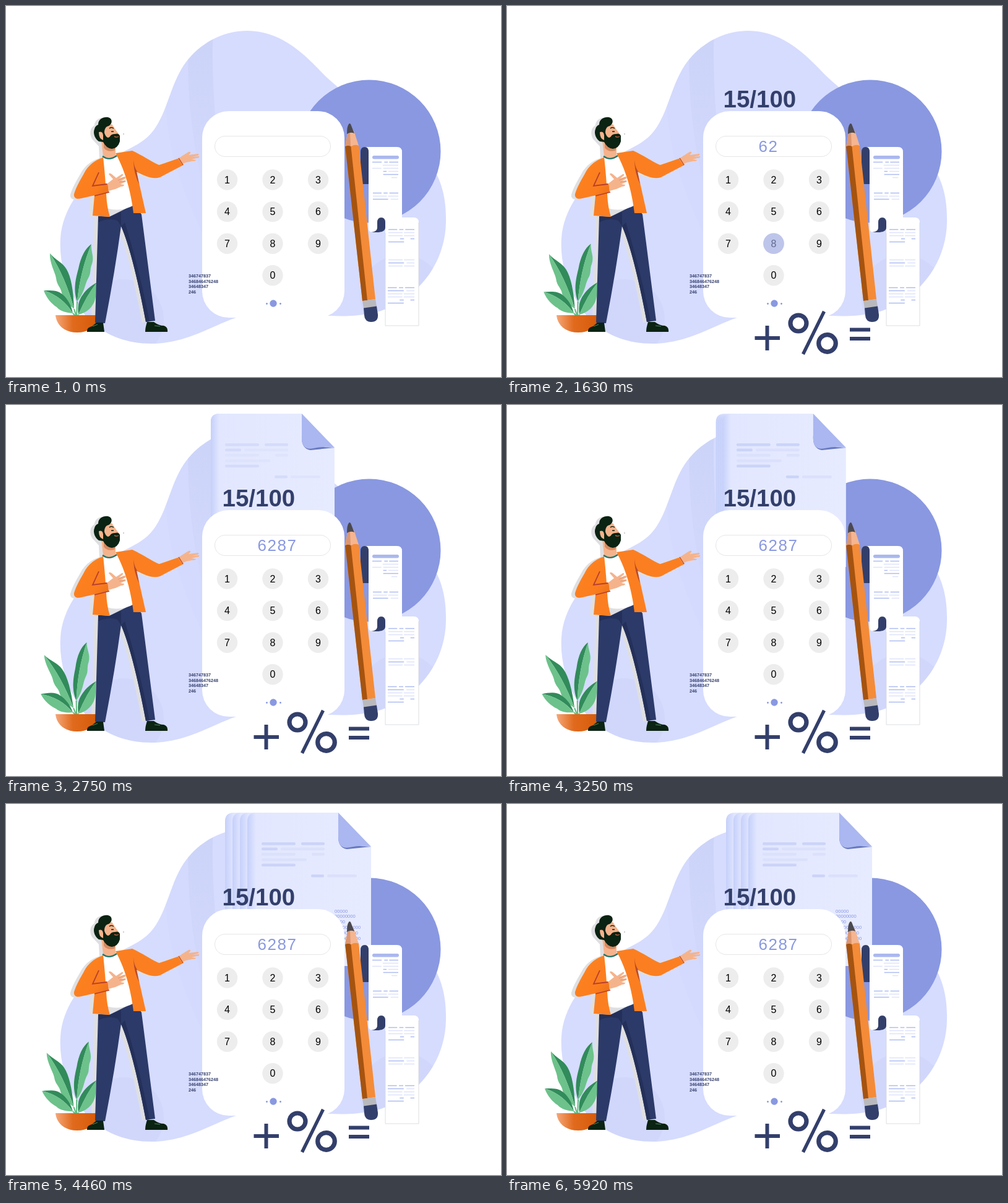
These frames come from a looping animation (800 px wide and 600 px high, 5.96 s). An HTML page:

```html
<!DOCTYPE html>
<html lang="en">
<head>
<meta charset="utf-8">
<title>Calculator</title>
<style>
html, body { margin: 0; width: 100%; height: 100%; overflow: hidden; background: #fff; }
svg { display: block; width: 800px; height: 600px; }
text { font-family: "Liberation Sans", Arial, sans-serif; }
.navy { fill: #333f6b; }
.skin { fill: #f5b38c; }
.hair { fill: #0a2312; }
.small { font-size: 7.2px; font-weight: bold; }
</style>
</head>
<body>
<svg viewBox="0 0 800 600">
<defs>
  <linearGradient id="pageFill">
    <stop offset="0" stop-color="#c5d0fa"/><stop offset=".07" stop-color="#e2e7ff"/><stop offset="1" stop-color="#e7ebff"/>
  </linearGradient>
  <linearGradient id="potFill">
    <stop offset="0" stop-color="#f6a779"/><stop offset=".4" stop-color="#e06a1d"/><stop offset="1" stop-color="#d65a08"/>
  </linearGradient>
  <linearGradient id="sleeveFill" x1="0" y1="0" x2="1" y2="1">
    <stop offset="0" stop-color="#ff8420"/><stop offset=".7" stop-color="#fb7d1e"/><stop offset="1" stop-color="#e8701a"/>
  </linearGradient>
  <linearGradient id="bandFill" x1="0" y1="0" x2="0" y2="1">
    <stop offset="0" stop-color="#b9c4ee" stop-opacity=".36"/><stop offset="1" stop-color="#b9c4ee" stop-opacity=".12"/>
  </linearGradient>
  <clipPath id="blobClip"><use href="#blob"/></clipPath>
  <path id="blob" d="M390 40C440 41 474 69 508 105C545 145 640 205 678 246C704 275 712 311 711 350C710 402 683 452 631 482C602 499 563 503 524 501L372 504C331 518 291 546 235 546C184 546 137 524 112 476C94 445 86 409 88 376C91 329 121 294 150 263C181 231 219 232 242 196C265 160 268 114 299 81C323 55 356 40 390 40Z"/>
  <path id="headShape" d="M145 214C140 205 142 196 149 192C149 184 157 179 165 180C173 182 172 190 169 194L174 196L183 209L184 220L177 230L176 246L157 246L156 226Z"/>
  <path id="coatShape" d="M157 245C142 250 132 259 126 271C119 283 113 294 110 304C109 311 115 313 122 311L143 307L140 339L168 341L206 335L226 335L211 268C225 275 237 281 249 277L287 257L280 246L248 257C241 257 222 243 205 234Z"/>
  <path id="legShape" d="M149 340L167 341L207 321L219 337L241 509L226 511Q205 400 186 356Q176 430 160 513L144 512Z"/>
</defs>

<use href="#blob" fill="#d6dcfe"/>
<g clip-path="url(#blobClip)" fill="#b9c4ee">
  <path fill="url(#bandFill)" d="M295 60L335 40C330 130 345 250 350 320L326 320C303 240 291 145 295 60Z"/>
  <path opacity=".1" d="M258 130C255 230 290 310 326 385L326 320C303 240 291 145 295 60Z"/>
  <circle opacity=".18" cx="190" cy="507" r="65"/>
  <circle opacity=".18" cx="640" cy="470" r="68"/>
</g>
<circle cx="587" cy="235" r="115.5" fill="#8998e1"/>

<g id="stack"></g>
<text id="ratio" class="navy" x="349.5" y="164" font-size="38.5" font-weight="bold">15/100</text>

<rect x="317" y="170" width="230" height="334" rx="43" fill="#fff"/>
<rect x="337.5" y="210.5" width="187" height="33" rx="16.5" fill="#fff" stroke="#e6e6e9"/>
<g id="digits" fill="#8998e1" font-size="26"></g>
<g id="keys" font-size="16" text-anchor="middle"></g>
<g fill="#8998e1">
  <circle cx="432" cy="481" r="5.7"/><circle cx="421.5" cy="481.5" r="1.4"/><circle cx="443.5" cy="481.5" r="1.4"/>
</g>
<g class="navy small">
  <text x="295" y="439">346747837</text><text x="295" y="447.6">346846476248</text>
  <text x="295" y="456.2">34648347</text><text x="295" y="464.8">246</text>
</g>

<g id="signs" fill="none" stroke="#333f6b" stroke-width="6">
  <path d="M400.5 537H441M420.5 517V557M554 523.5H587M554 538H587"/>
  <path d="M478.5 563L512.5 494" stroke-width="5.4"/>
  <circle cx="471" cy="513" r="13" stroke-width="7.2"/>
  <circle cx="517.5" cy="545.5" r="13.8" stroke-width="7.2"/>
</g>

<!-- receipts -->
<path class="navy" d="M573 288V236Q573 228 580 228H589V288Z"/>
<path d="M580 228H632Q640 228 640 236V345H606V366H592Q586 366 586 359V236Q586 228 580 228Z" fill="#fff"/>
<path class="navy" d="M587 366H599Q613 366 613 358V342H607Q600 342 600 350V358Q600 366 587 366Z"/>
<path d="M606 342H659Q667 342 667 350V517H613V350Q613 342 606 342Z" fill="#fff"/>
<path d="M667 350V517H613V367" fill="none" stroke="#d5d6dc" stroke-width=".8"/>
<rect x="592" y="242" width="43" height="5.5" rx="2.7" fill="#aab8ee"/>
<g id="receiptLines" stroke-width="1.5"></g>

<!-- pencil -->
<path d="M548 226L559 220L570 225L597 474L576 477Z" fill="#f48b38"/>
<path d="M548 226L557 223L584 476L576 477Z" fill="#a55310"/>
<path d="M555 190L548 227Q553 224 558 227Q564 223 570 226L563 204Z" fill="#f5b590"/>
<path d="M555 190L548 227Q553 224 557 227L556 204Z" fill="#dc9771"/>
<path d="M554 191Q551 194 551 207Q557 203 563 206L557 191Q555 189 554 191Z" fill="#4b4950"/>
<path d="M576 477L597 474L599 486L578 489Z" fill="#b9b9bd"/>
<path class="navy" d="M578 488.5L599 485.5L601 499Q602 511 590 511Q580 511 579 500Z"/>

<!-- figure -->
<g transform="translate(-6 1)" fill="#dfdfe1">
  <use href="#headShape"/><use href="#coatShape"/><use href="#legShape"/>
</g>
<g id="plant"></g>
<path d="M80 500H150C148 518 134 528 115 528C96 528 82 518 80 500Z" fill="url(#potFill)"/>

<use href="#legShape" fill="#2c3a69"/>
<path d="M149 340L167 341L186 333L186 356L180 347Q165 342 149 350ZM186 356L192 350Q214 420 232 510L226 511Q205 400 186 356Z" fill="#243059"/>
<path class="hair" d="M131 527Q130 520 139 518L146 512H157L159 527ZM225 527Q225 520 228 511L239 511Q247 517 255 517Q262 519 261 527Z"/>
<path d="M140 518L148 515M240 517L249 518" stroke="#4e8a63" stroke-width="1"/>
<path d="M157 244H183L201 292L207 322Q185 334 163 327Z" fill="#fff"/>
<path d="M154 217L177 226V243Q167 249 157 243Z" class="skin"/>
<path d="M158 222Q166 231 177 229L175 234Q163 237 158 229Z" fill="#d68a61"/>
<path d="M156 243Q167 251 179 242" fill="none" stroke="#23766c" stroke-width="2.2"/>
<path class="skin" d="M156 196L171 191L177 200L183 208L182 214L165 220L152 217Z"/>
<path class="hair" d="M150 219C144 215 140 206 143 199C144 195 146 193 149 192C149 183 157 179 165 180C173 182 172 191 166 194C161 195 159 199 159 205C161 212 165 215 168 211Q170 207 176 207Q182 205 184 210L184 219Q181 230 171 231Q162 230 157 220Z"/>
<path d="M150 204Q156 202 157 209L157 217Q150 215 150 204Z" class="skin"/>
<path d="M167 198Q170 195 174 198M170 203H174" fill="none" stroke="#0a2312" stroke-width="1.4"/>
<path d="M175 211Q179 213 182 211" stroke="#c75e43" stroke-width="1.5" fill="none"/>
<circle cx="190" cy="207" r=".7" fill="#777"/>

<path d="M157 245C142 250 132 259 126 271L144 296L140 339L168 341Q163 326 162 304Q160 270 157 245Z" fill="#fb7f20"/>
<path d="M177 238L204 234C222 242 241 256 248 257L280 246L287 257L249 277C237 281 225 275 211 268L226 335L206 335Q199 278 177 238Z" fill="#fb7f20"/>
<path d="M206 249Q207 262 213 269L224 273L211 268L215 288Q206 269 206 249Z" fill="#b94a2b"/>
<path d="M157 245C142 250 132 259 126 271C119 283 113 294 110 304C109 311 115 313 122 311L166 301L165 287L140 291L149 272Z" fill="url(#sleeveFill)"/>
<path d="M150 269L140 291L163 288M143 307L167 301" fill="none" stroke="#b63e30" stroke-width="1.8"/>
<path class="skin" d="M164 287L173 280L166 272Q167 269 171 272L178 278L187 272Q190 271 189 274L183 279L192 276Q195 276 193 279L186 283L193 282Q195 284 192 285L185 288L191 289Q191 292 186 292L177 296L166 299Z"/>
<path d="M181 282L191 277M183 285L192 283" stroke="#d88e68" stroke-width=".8"/>
<path class="skin" d="M278 247L287 241L295 236Q299 235 298 238L295 241L310 239Q313 240 310 242L301 244L312 243Q313 246 308 246L300 248L307 249Q307 251 301 251L291 253L284 256Z"/>
<path d="M279 246L286 257" stroke="#c85727" stroke-width="1.5"/>
</svg>

<script>
const LOOP = 5960;
const $ = id => document.getElementById(id);

function add(parent, tag, attrs, text) {
  const el = document.createElementNS("http://www.w3.org/2000/svg", tag);
  for (const key in attrs) el.setAttribute(key, attrs[key]);
  if (text !== undefined) el.textContent = text;
  parent.appendChild(el);
  return el;
}
const clamp = v => Math.min(1, Math.max(0, v));
const span = (t, start, end) => clamp((t - start) / (end - start));
const easeOut = p => 1 - (1 - p) ** 3;
const easeBoth = p => (1 - Math.cos(Math.PI * p)) / 2;

// Keypad: overlay shades light up as keys are pressed.
const shades = {};
[1, 2, 3, 4, 5, 6, 7, 8, 9, 0].forEach((n, i) => {
  const cx = n ? 357.5 + (i % 3) * 73.5 : 431;
  const cy = 281 + Math.floor(i / 3) * 51.6;
  add($("keys"), "circle", { cx, cy, r: 16.7, fill: "#ededed" });
  add($("keys"), "text", { x: cx, y: cy + 5.6 }, n);
  shades[n] = add($("keys"), "circle", { cx, cy, r: 16.9, fill: "#a0ace8", opacity: 0 });
});
const presses = [6, 2, 8, 7].map((n, i) => ({
  time: 700 + i * 520,
  shade: shades[n],
  digit: add($("digits"), "text", { x: 406.5 + i * 16, y: 236 }, n)
}));

// Sheets, from the back one to the front one, with their final x.
const sheets = [354, 366, 378, 390].map(x => {
  const el = add($("stack"), "g", {});
  add(el, "path", { d: "M14 0H147L200 55V248H0V14Q0 0 14 0Z", fill: "url(#pageFill)" });
  return { x, el };
});
const front = sheets[3].el;
add(front, "path", { d: "M147 36Q146 57 161 59L200 55L165 53Z", fill: "#6778bf" });
add(front, "path", { d: "M147 0L200 55Q184 52 166 56Q147 60 147 40Z", fill: "#aab7f0" });
const print = add(front, "g", {});
const MID = "#cbd4f8", PALE = "#dbe1fb";
[
  [23, 48, 55, MID], [87, 48, 38, MID], [23, 56.5, 26, MID], [54, 56.5, 71, PALE],
  [23, 65, 55, PALE], [104, 65, 21, PALE], [23, 74, 73, PALE], [23, 82.5, 55, MID],
  [103, 100, 21, MID], [129, 100, 48, PALE]
].forEach(([x, y, width, fill]) => add(print, "rect", { x, y, width, height: 4.5, rx: 2, fill }));
[5, 8, 4, 10, 9, 10].forEach((n, i) =>
  add(print, "text", { x: 141, y: 161.5 + i * 8.8, "font-size": 7.6, fill: "#8998e1" }, "0".repeat(n)));

function receiptBlock(x, y, width, rows) {
  rows.forEach((row, i) => row.forEach(([a, b, strong]) =>
    add($("receiptLines"), "path", {
      d: `M${x + a * width} ${y + i * 5}H${x + b * width}`,
      stroke: strong ? "#aebcf1" : "#dde3fb"
    })));
}
const head = [[[0, .36, 1], [.46, .6, 1], [.65, 1, 1]], [[.4, 1, 0]], [[0, .35, 0], [.42, 1, 0]],
  [[.42, .55, 1], [.62, 1, 0]], [[.42, 1, 1]], [[.74, .96, 0]]];
const body = [[[0, .34, 1], [.42, .58, 1], [.65, 1, 1]], [[0, .55, 0], [.6, 1, 0]], [[0, .6, 1], [.7, 1, 0]]];
const low = [[[0, .55, 0], [.6, 1, 0]], [[.45, .6, 1], [.85, 1, 1]], [[0, .6, 1]]];
receiptBlock(592, 252.5, 42, head);
receiptBlock(593, 302.5, 41, body);
receiptBlock(618, 361.5, 42, [body[0], body[1], ...low]);
receiptBlock(618, 410.5, 42, [body[1], body[2], low[0]]);
receiptBlock(617, 455.5, 43, [body[0], body[2], body[1], ...low]);

// Leaves: dark side and light side (both from base to tip), the vein back to the base, pivot, swing in degrees.
const leaves = [
  ["M117 499C115 485 118 475 124 467C130 458 138 452 147 447",
    "M117 499C128 497 137 490 142 480C147 470 145 460 147 447", "Q130 468 117 499Z", 114, 500, .6],
  ["M115 478C108 458 113 440 117 425C121 405 128 392 138 385",
    "M115 478C128 462 127 450 133 440C138 432 135 426 139 417C143 405 137 398 138 385", "Q120 428 115 478Z", 114, 500, 2.1],
  ["M110 490C109 460 105 438 98 426C92 415 80 411 71 400",
    "M110 490C104 484 93 478 90 464C89 455 82 452 81 440C80 432 70 415 71 400", "Q96 438 110 490Z", 112, 500, 3.1],
  ["M108 497C106 485 100 474 92 467C84 459 72 460 61 460",
    "M108 497C98 496 88 494 82 487C74 482 65 472 61 460", "Q92 470 108 497Z", 110, 497, 4.8]
].map(([dark, light, vein, px, py, swing]) => {
  const el = add($("plant"), "g", {});
  const base = dark.slice(1, 8);
  add(el, "path", { d: `M114 503L${base}`, stroke: "#5fb981", "stroke-width": 2 });
  add(el, "path", { d: dark + vein, fill: "#318b5a" });
  add(el, "path", { d: light + vein, fill: "#6cc28a" });
  return { el, px, py, swing };
});

function draw(t) {
  const sway = Math.cos(2 * Math.PI * t / (LOOP / 3)) - 1;
  for (const { el, px, py, swing } of leaves)
    el.setAttribute("transform", `rotate(${sway * swing} ${px} ${py})`);

  const rise = 1 - easeOut(span(t, 20, 600));
  $("ratio").setAttribute("transform", `translate(0 ${rise * 42})`);
  $("ratio").setAttribute("opacity", span(t, 20, 300));
  $("signs").setAttribute("transform", `translate(0 ${rise * 18})`);
  $("signs").setAttribute("opacity", span(t, 20, 500));

  for (const { time, shade, digit } of presses) {
    shade.setAttribute("opacity", clamp(1 - Math.abs(t - time) / 280));
    digit.setAttribute("opacity", span(t, time - 50, time + 110));
  }

  const shown = span(t, 2080, 2470);
  const fan = easeBoth(span(t, 2820, 4020));
  const top = 14 + 55 * (1 - easeOut(shown));
  $("stack").setAttribute("opacity", shown);
  for (const { x, el } of sheets)
    el.setAttribute("transform", `translate(${331 + (x - 331) * fan} ${top})`);
  print.setAttribute("opacity", span(t, 2450, 2950));
}

function tick() {
  draw(performance.now() % LOOP);
  requestAnimationFrame(tick);
}
draw(0);
requestAnimationFrame(tick);
</script>
</body>
</html>
```
